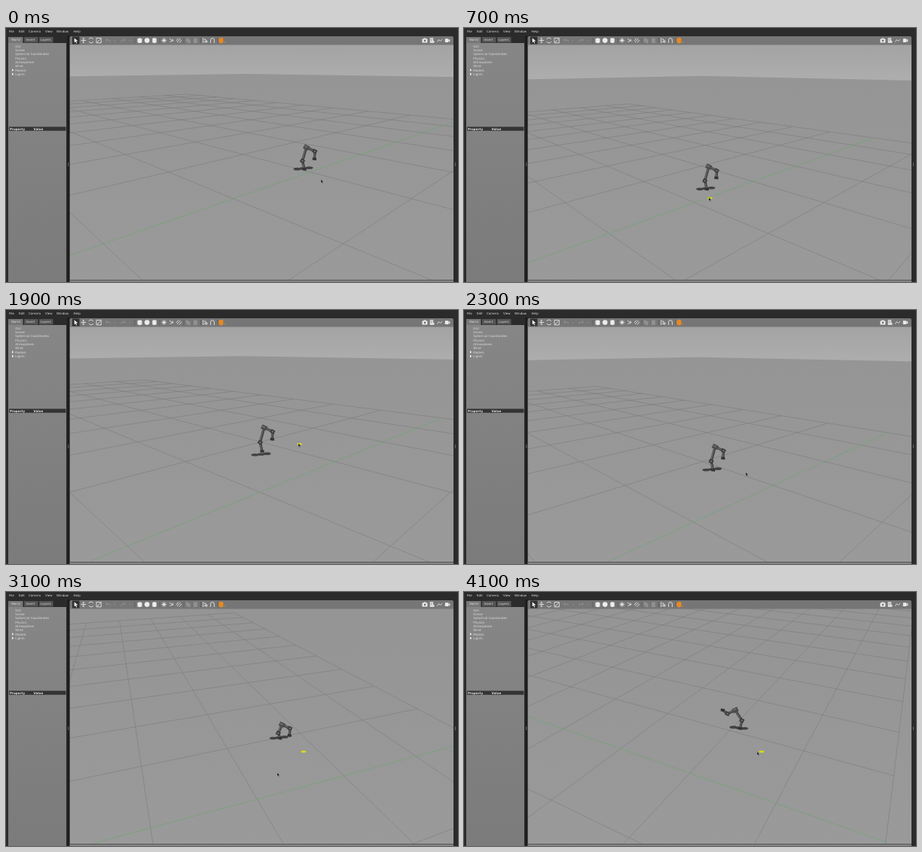
Write an HTML page with a canvas that moves like this. It is 600 px wide and 338 px high and loops after 4200 ms.

```html
<!DOCTYPE html>
<html lang="en">
<head>
<meta charset="utf-8">
<title>Robot simulation</title>
<style>
  html, body { margin: 0; width: 100%; height: 100%; overflow: hidden; background: #2b2b2b; }
  canvas, svg { position: absolute; left: 0; top: 0; width: 600px; height: 338px; }
  text { font: 4.1px "DejaVu Sans", sans-serif; fill: #dcdcdc; }
  .bold { font-weight: bold; }
  .line { fill: none; stroke: #e4e4e4; stroke-width: .9; }
  .dim { fill: none; stroke: #969696; stroke-width: .9; }
  .rule { fill: none; stroke: #555; stroke-width: .6; }
</style>
</head>
<body>
<canvas id="view" width="600" height="338"></canvas>
<svg id="ui" viewBox="0 0 600 338">
  <defs>
    <linearGradient id="panel" x2="0" y2="1">
      <stop offset="0" stop-color="#868686"/><stop offset="1" stop-color="#7b7b7b"/>
    </linearGradient>
  </defs>
  <path fill="#2b2b2b" d="M0 0H600V338H0ZM84.5 22V336H594V22Z" fill-rule="evenodd"/>
  <path fill="url(#panel)" d="M3 20H80V338H3Z"/>
  <path fill="#777" d="M3 12H22.5V20H3Z"/>
  <path fill="#555" d="M24 12H42.5V19.5H24ZM44 12H62.5V19.5H44Z"/>
  <path fill="#333" d="M4 131.4H79.5V136.8H4Z"/>
  <path fill="#1c1c1c" d="M81.5 10H84.3V338H81.5Z"/>
  <path fill="#767676" d="M84.5 22.5V13q0-2 2-2H592q2 0 2 2V22.5Z"/>
  <path fill="#555" d="M84.5 335H594V336H84.5Z"/>
  <path fill="#858585" d="M84.5 336H594V338H84.5Z"/>
  <path fill="#666" d="M82.3 179h1v5h-1ZM596 179h1v5h-1Z"/>
  <path fill="#f0f0f0" d="M8 54.2l2.4 1.8-2.4 1.8ZM8 59.6l2.4 1.8-2.4 1.8Z"/>

  <path fill="#303030" d="M88 11.5h9.5v10H88Z"/>
  <path fill="#eee" d="M90.6 13.3l4.8 4-2.2.2 1.1 2.4-1 .5-1.1-2.4-1.5 1.4Z"/>
  <path class="line" d="M99.5 16.5h6.6M102.8 13.2v6.6M101.6 14.4l1.2-1.2 1.2 1.2M101.6 18.6l1.2 1.2 1.2-1.2M110 15a3 3 0 0 1 5.6 0M115.8 18a3 3 0 0 1-5.6 0M120 13.5h6.3v6.3H120ZM121 19l4.5-4.5"/>
  <path class="dim" d="M133 16h3.5q2 0 2 2.5M134.5 14.3L132.6 16l1.9 1.7M158 16h-3.5q-2 0-2 2.5M156.5 14.3l1.9 1.7-1.9 1.7"/>
  <path fill="#969696" d="M143 16.2h2.4l-1.2 1.4ZM163.5 16.2h2.4l-1.2 1.4Z"/>
  <path class="rule" d="M171 13v7.5M204 13v7.5M236 13v7.5M258.5 13v7.5M281 13v7.5"/>
  <path fill="#ececec" d="M174.5 14.2l3-1 3 1v5l-3 1-3-1ZM194.3 14q2.7-1.6 5.4 0v5.2q-2.7 1.6-5.4 0Z"/>
  <circle cx="187.2" cy="16.6" r="3.3" fill="#ececec"/>
  <circle cx="209.8" cy="16.5" r="1.5" fill="#eee"/>
  <path class="line" d="M206.5 16.5h6.6M209.8 13.2v6.6M207.5 14.2l4.6 4.6M212.1 14.2l-4.6 4.6M217 14l4 3M217.5 18.5l3.8-1.6M221 14.5l1 3M226 17l3-3.5M227 19l4.5-5M230 19.5l3-3.5"/>
  <path fill="#909090" d="M238.7 13.5h3.6v5h-3.6ZM241 15h3.6v5H241ZM249 13.5h5v6.5h-5Z"/>
  <path class="line" d="M261.7 13v7M263 15h2v3.5h-2M265 17h2v2h-2M271.6 20v-4a2.4 2.4 0 0 1 4.8 0v4"/>
  <path fill="#e88824" d="M282.4 14l3-1.2 3 .6v6l-3 1-3-1.2ZM289 18.2h2.4l-1.2 1.4Z"/>
  <path fill="#ececec" d="M552.5 14.5h1.6l.7-1.1h2.3l.7 1.1h1.6v5h-6.9ZM562.7 13.3h4.5v6.5h-4.5Z"/>
  <circle cx="556" cy="16.9" r="1.3" fill="#707070"/>
  <path class="rule" d="M563.5 15h3M563.5 17h2.4"/>
  <circle cx="567.3" cy="18.5" r="1.4" fill="#ddd"/>
  <path class="line" d="M572.5 18.5l2-3 2 2 2.6-2.4"/>
  <path fill="#ececec" d="M582.8 14.3h4.6v4.8h-4.6ZM587.7 16l1.6-1.2v3.8l-1.6-1.2Z"/>
</svg>
<script>
const LOOP = 4200, STEP = 100;
const FOCAL = 441, CX = 339.5, CY = 179;

// time, camera x, y and height, distance walked, pointer x and y
const keys = [
  [0, 1.90, 2.42, 0.995, 5.04, 419, 202],
  [700, 2.58, 2.81, 1.41, 5.38, 326, 226],
  [1400, 2.58, 3.06, 1.455, 6.2, 399, 179],
  [1900, 1.62, 4.40, 1.013, 6.66, 389, 178],
  [2700, 1.82, 4.72, 1.463, 7.12, 361, 255],
  [3100, 2.339, 6.10, 2.166, 7.7, 361, 241],
  [4100, 2.379, 9.624, 2.36, 8.1, 390, 213]
];
const ORBIT_START = 2700, ORBIT_MID = 3100, ORBIT_END = 4100;
const pivot = [395, 212.5];

const ctx = document.getElementById("view").getContext("2d");
const ramp = (t, a, b) => Math.min(1, Math.max(0, (t - a) / (b - a)));
const mix = (a, b, k) => a + (b - a) * k;

function sceneAt(t) {
  const i = Math.max(1, keys.findIndex(k => t <= k[0]));
  const k = ramp(t, keys[i - 1][0], keys[i][0]);
  const [, x, y, height, walked, px, py] = keys[i].map((v, j) => mix(keys[i - 1][j], v, k));
  const rise = ramp(t, ORBIT_START, ORBIT_MID), spin = ramp(t, ORBIT_MID, ORBIT_END);
  const turn = Math.PI / 4 + 0.4 * rise + 0.869 * spin;
  const pitch = 0.2756 + 0.2214 * rise + 0.053 * spin;
  return { cam: { x, y, height, turn, pitch }, walked, pointer: [px, py], spin };
}

function toCamera(cam, x, y) {
  const dx = x - cam.x, dy = y - cam.y;
  const s = Math.sin(cam.turn), c = Math.cos(cam.turn);
  const sp = Math.sin(cam.pitch), cp = Math.cos(cam.pitch);
  const ahead = dy * c - dx * s;
  return [dx * c + dy * s, cam.height * cp - ahead * sp, ahead * cp + cam.height * sp];
}

const toScreen = ([x, y, z]) => [CX + FOCAL * x / z, CY + FOCAL * y / z];

function stroke(points, color, width) {
  ctx.beginPath();
  points.forEach(p => ctx.lineTo(p[0], p[1]));
  ctx.strokeStyle = color;
  ctx.lineWidth = width;
  ctx.stroke();
}

function ellipse(x, y, rx, ry, color) {
  ctx.fillStyle = color;
  ctx.beginPath();
  ctx.ellipse(x, y, rx, ry, 0, 0, Math.PI * 2);
  ctx.fill();
}

function fade(y1, y2, top, bottom) {
  const g = ctx.createLinearGradient(0, y1, 0, y2);
  g.addColorStop(0, top);
  g.addColorStop(1, bottom);
  return g;
}

function groundLine(cam, x1, y1, x2, y2, color) {
  const near = 0.1;
  let a = toCamera(cam, x1, y1), b = toCamera(cam, x2, y2);
  if (a[2] < near && b[2] < near) return;
  const cut = (p, q) => p.map((v, i) => mix(v, q[i], (near - p[2]) / (q[2] - p[2])));
  if (a[2] < near) a = cut(a, b);
  else if (b[2] < near) b = cut(b, a);
  stroke([toScreen(a), toScreen(b)], color, 0.65);
}

function drawGround(cam) {
  ctx.fillStyle = fade(60, 336, "#959595", "#9a9a9a");
  ctx.fillRect(84, 22, 511, 315);

  if (cam.pitch < 0.42) {
    const edge = [[-50, 0], [-50, 50], [0, 50]].map(p => toScreen(toCamera(cam, ...p)));
    ctx.fillStyle = fade(22, 66, "#a3a3a3", "#adadad");
    ctx.beginPath();
    ctx.moveTo(edge[0][0], 0);
    edge.forEach(p => ctx.lineTo(...p));
    ctx.lineTo(edge[2][0], 0);
    ctx.fill();
  }

  for (let i = -10; i <= 10; i++) {
    groundLine(cam, -10, i, 10, i, "#7e7e7e");
    if (i) groundLine(cam, i, -10, i, 10, "#7e7e7e");
  }
  groundLine(cam, 0, -10, 0, 10, "#6fa56f");
}

function block([x, y], w, h, angle, color) {
  ctx.save();
  ctx.translate(x, y);
  ctx.rotate(angle);
  ctx.fillStyle = color;
  ctx.fillRect(-w / 2, -h / 2, w, h);
  ctx.restore();
}

function drawRobot({ cam, walked, spin }, t) {
  const at = toCamera(cam, -0.1 - 0.33 * (walked - 5.04), walked);
  const [gx, gy] = toScreen(at);
  const size = Math.pow(FOCAL / at[2] / 105, 0.3);
  const face = 1 - 2 * spin;
  const crouch = Math.max(0, Math.cos((t - 1400) / 1700 * 2 * Math.PI)) ** 2;
  const squat = 1 - 0.38 * crouch;
  const lift = 7 * Math.sin(Math.PI * ramp(t, 1150, 2150));

  for (const i of [-1, 0, 1])
    ellipse(gx - 1.5 + i * 7.5 * size, gy - 1 + i * face * -0.8, 5, 1.8, "#414141");

  // each link continues from the end of the one before
  const links = [
    [-2.5, -11 * squat],
    [mix(5, 9, spin), mix(-18.5, -14, spin) * squat],
    [10.5, 5],
    [mix(-0.5, 6.5, spin), mix(9.5, -5, spin)]
  ];
  const joints = [[gx, gy - lift]];
  for (const [dx, dy] of links) {
    const [x, y] = joints[joints.length - 1];
    joints.push([x + dx * face * size, y + dy * size]);
  }
  const [footA, kneeA, hip, kneeB, footB] = joints;

  ctx.lineJoin = "round";
  stroke(joints, "#424242", 3.4);
  stroke(joints.map(([x, y]) => [x - 0.5, y - 0.4]), "#6c6c6c", 1.2);
  const lean = Math.atan2(kneeB[1] - hip[1], kneeB[0] - hip[0]);
  block(hip, 7.5, 6, lean, "#4a4a4a");
  block([hip[0] - 0.6, hip[1] - 0.8], 4.6, 2.2, lean, "#686868");
  for (const p of [kneeA, kneeB]) {
    block(p, 5.6, 5, 0.5, "#3a3a3a");
    block(p, 2.4, 2, 0.5, "#727272");
  }
  for (const p of [footA, footB]) block(p, 5.2, 3.4, 0.15, "#343434");
}

function drawPointer([x, y], t) {
  const orbiting = t > ORBIT_START;
  const panning = t >= 500 && t < 1000 || t >= 1700 && t < 2200 || t >= 2500;
  const [mx, my] = orbiting ? pivot : [x + 0.5, y + 0.3];
  if (panning) ellipse(mx, my, 3.4, 1.4, "#d8d81c");

  ctx.save();
  ctx.translate(x, y);
  ctx.fillStyle = "#111";
  ctx.strokeStyle = "#bbb";
  ctx.lineWidth = 0.3;
  const arrow = new Path2D("M-.9-.5V4l1-.9.8 1.8.8-.4-.8-1.7h1.4Z");
  ctx.fill(arrow);
  ctx.stroke(arrow);
  ctx.restore();
}

function draw(time) {
  const t = Math.floor((time % LOOP) / STEP) * STEP;
  const scene = sceneAt(t);
  drawGround(scene.cam);
  drawRobot(scene, t);
  drawPointer(scene.pointer, t);
}

function label(x, y, text, cls = "") {
  const el = document.createElementNS("http://www.w3.org/2000/svg", "text");
  el.setAttribute("x", x);
  el.setAttribute("y", y);
  el.setAttribute("class", cls);
  el.textContent = text;
  document.getElementById("ui").append(el);
}

[["File", 4], ["Edit", 17], ["Camera", 30], ["View", 52], ["Window", 67], ["Help", 89.5]]
  .forEach(([s, x]) => label(x, 5.7, s));
["World", "Insert", "Layers"].forEach((s, i) => label(7 + i * 19.5, 17, s));
["GUI", "Scene", "Spherical Coordinates", "Physics", "Atmosphere", "Wind", "Models", "Lights"]
  .forEach((s, i) => label(12.3, 25.6 + i * 5.34, s));
label(5, 135.6, "Property", "bold");
label(36.5, 135.6, "Value", "bold");

const start = performance.now();
function tick() {
  draw(performance.now() - start);
  requestAnimationFrame(tick);
}
tick();
</script>
</body>
</html>
```
